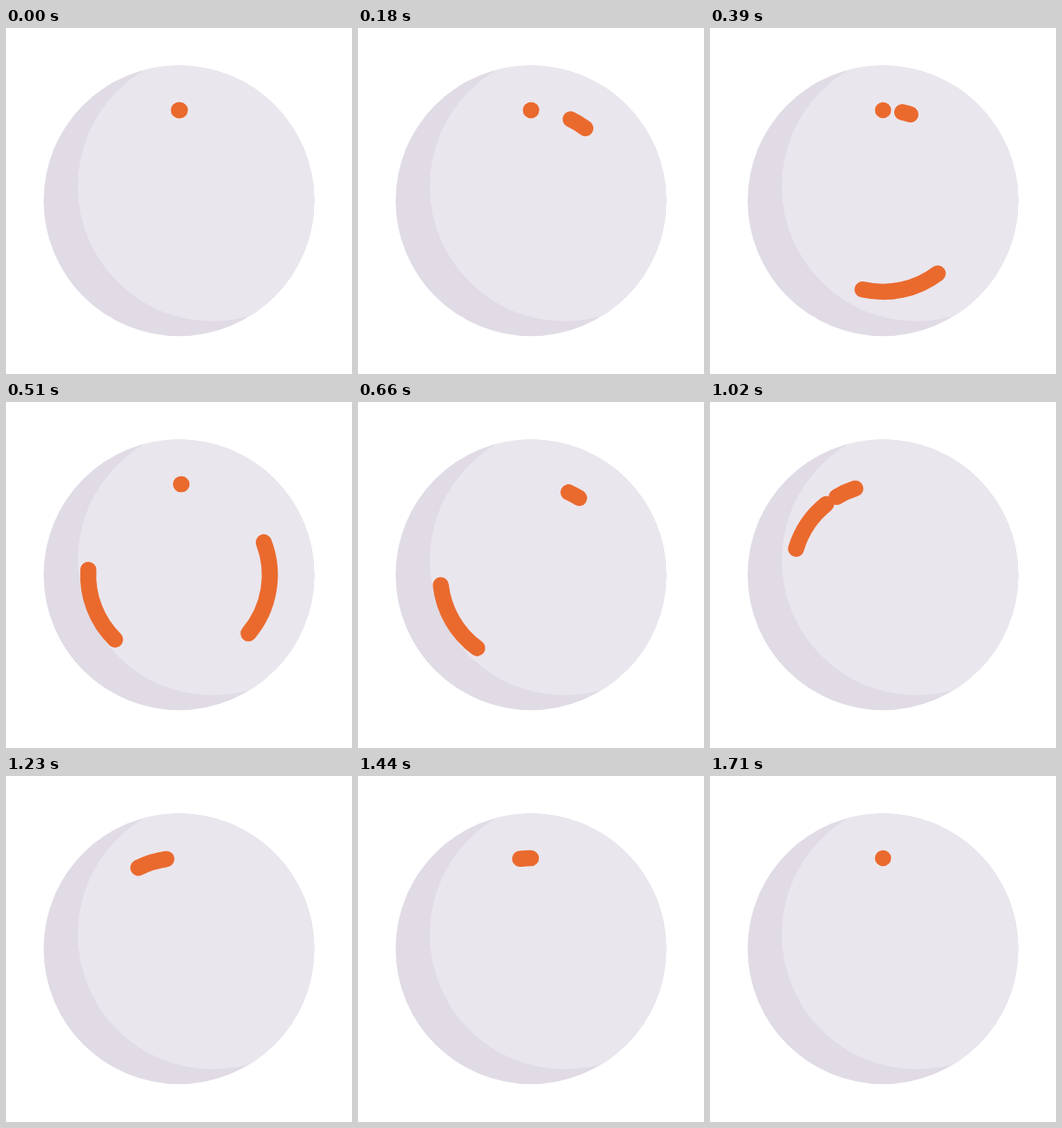
Write an HTML page that moves like this. It is 400 px wide and 400 px high and loops after 1770 ms.

```html
<!DOCTYPE html>
<html lang="en">
<head>
<meta charset="utf-8">
<title>Orbit loader</title>
<style>
  html, body { margin: 0; width: 100%; height: 100%; overflow: hidden; background: #fff; }
  svg { display: block; width: 100vw; height: 100vh; }
</style>
</head>
<body>
<svg viewBox="0 0 400 400">
  <defs><clipPath id="ball"><circle cx="200" cy="199.7" r="156.5"/></clipPath></defs>
  <circle cx="200" cy="199.7" r="156.5" fill="#e0dbe5"/>
  <circle cx="239" cy="183" r="156" fill="#eae6ed" clip-path="url(#ball)"/>
  <g id="arcs" fill="none" stroke="#ea6a2e" stroke-width="18.6" stroke-linecap="round"></g>
</svg>
<script>
const LOOP = 1770, STEP = 30, LAST = 1710, RADIUS = 105;

// Each end of a stroke eases through one turn; the lists are Bezier control times in ms.
const strokes = [
  { tail: [-30, 506, 270, 1226], head: [-30, 429, 253, 981], until: 600 },
  { tail: [248, 783, 248, 1569], head: [237, 751, 137, 1453], until: 1080 },
  { tail: [453, 1047, 478, 1709], head: [450, 1002, 462, 1461], until: LOOP }
];

const group = document.getElementById('arcs');
for (const stroke of strokes) {
  stroke.path = document.createElementNS('http://www.w3.org/2000/svg', 'path');
  group.appendChild(stroke.path);
}

function bezier([a, b, c, d], p) {
  const q = 1 - p;
  return a * q * q * q + 3 * b * q * q * p + 3 * c * q * p * p + d * p * p * p;
}

function turn(times, t) {
  if (t <= times[0]) return 0;
  if (t >= times[3]) return 360;
  let low = 0, high = 1;
  for (let i = 0; i < 30; i++) {
    const mid = (low + high) / 2;
    if (bezier(times, mid) < t) low = mid; else high = mid;
  }
  return 360 * low * low * (3 - 2 * low);
}

function point(degrees) {
  const angle = degrees * Math.PI / 180;
  const x = 200 + RADIUS * Math.sin(angle);
  const y = 200 - RADIUS * Math.cos(angle);
  return x.toFixed(3) + ' ' + y.toFixed(3);
}

function arc(from, to) {
  const end = Math.max(to, from + 0.05);
  return `M${point(from)}A${RADIUS} ${RADIUS} 0 ${end - from > 180 ? 1 : 0} 1 ${point(end)}`;
}

function draw(t) {
  for (const { path, tail, head, until } of strokes) {
    path.setAttribute('d', t < until ? arc(turn(tail, t), turn(head, t)) : '');
  }
}

const start = performance.now();
function tick() {
  const t = (performance.now() - start) % LOOP;
  draw(Math.min(Math.floor(t / STEP) * STEP, LAST));
  requestAnimationFrame(tick);
}
tick();
</script>
</body>
</html>
```
